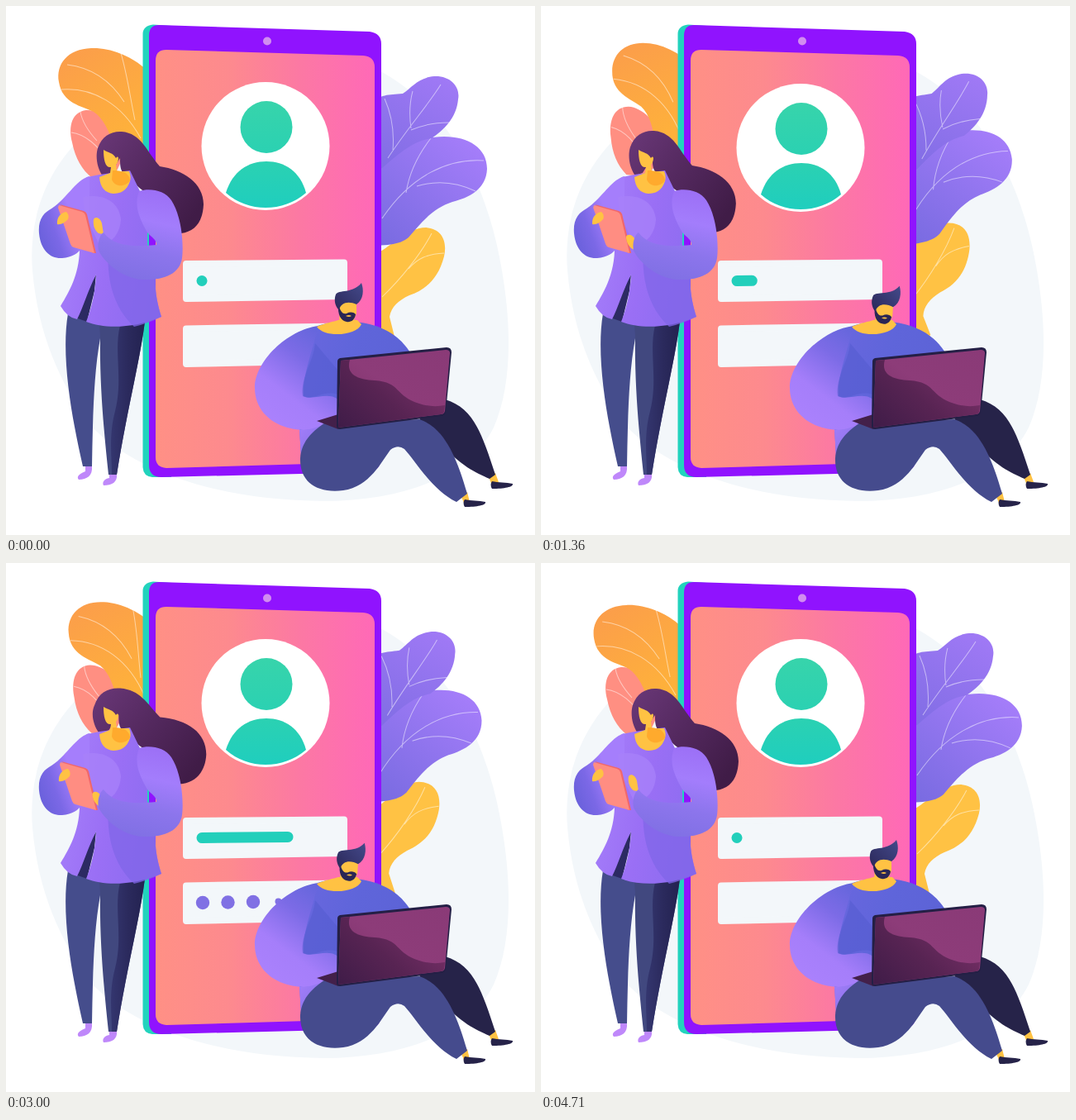
An HTML page for the animation above (4.78 s loop, 640 by 640 pixels).

```html
<!DOCTYPE html>
<html lang="en">
<head>
<meta charset="utf-8">
<title>Sign in</title>
<style>
  html, body { margin: 0; width: 100%; height: 100%; overflow: hidden; background: #fff; }
  svg { display: block; width: 100%; height: 100%; }
  .vein { fill: none; stroke: #fff; stroke-opacity: .5; stroke-width: 1; }
  .field { fill: #f3f7fa; stroke: #f3f7fa; stroke-width: 8; stroke-linejoin: round; }
</style>
</head>
<body>
<svg viewBox="0 0 640 640">
  <defs id="defs"></defs>
  <path fill="#f3f7fa" d="M90 160C40 210 28 270 32 320C39 400 66 455 100 505C150 560 250 598 385 599C480 598 560 570 590 510C612 460 612 390 600 320C585 230 545 130 455 80Z"/>

  <g id="salmon">
    <path fill="#ff8f82" d="M97 126C80 128 75 145 80 165C84 185 92 198 104 208L130 208L150 165C132 140 114 125 97 126Z"/>
    <path class="vein" d="M79 153C95 155 112 168 124 190M90 128C92 140 100 152 110 163"/>
  </g>
  <g id="orange">
    <path fill="url(#gOrange)" d="M165 73C150 60 125 50 103 51C75 52 60 70 64 92C68 118 92 121 106 128C118 136 124 150 132 172L190 195L215 150L205 95Z"/>
    <path class="vein" d="M67 101C105 98 140 118 163 160M74 71C100 74 125 88 143 116M139 57C147 84 150 110 156 138"/>
  </g>
  <g id="amber">
    <path fill="#ffc244" d="M508 268C528 270 534 285 530 303C523 330 508 343 488 350C475 356 466 364 464 376L470 400L445 405L425 380L440 305C468 290 485 268 508 268Z"/>
    <path class="vein" d="M515 275C502 300 478 330 455 352M530 299C510 300 498 305 487 318"/>
  </g>
  <g id="violet">
    <path fill="url(#gViolet)" d="M435 200C470 180 490 158 530 158C560 158 582 172 582 197C581 222 560 232 540 237C515 245 500 265 487 280C475 290 460 289 430 291Z"/>
    <path class="vein" d="M578 187C535 184 490 205 455 257M514 160C500 178 488 200 484 226M568 224C545 213 520 211 497 218"/>
  </g>
  <g id="sprig">
    <path fill="url(#gSprig)" d="M435 122C455 105 462 108 480 106C492 98 498 87 518 85C538 84 550 98 547 113C545 135 530 150 515 160C495 163 480 174 455 196L435 200Z"/>
    <path class="vein" d="M526 95C512 118 484 150 462 184M492 103C488 118 488 134 490 148M536 141C520 141 504 144 490 150M458 112C466 130 470 150 468 174"/>
  </g>

  <path fill="#22d3bd" d="M178 22.500Q165.500 24 165.500 34V558Q166 569 177 570L200 570L200 24Z"/>
  <path fill="#9013fe" d="M185 23L440 31Q454 33 454 46V546Q453 563 438 564L188 570Q173 570 173 555V36Q173 23 185 23Z"/>
  <path fill="url(#gScreen)" d="M194 53L432 60Q446 61 446 74V539Q446 551 434 552L194 559Q181 558 181 546V66Q181 53 194 53Z"/>
  <circle cx="316" cy="42.500" r="5" fill="#d18df0"/>
  <g id="avatar">
    <circle cx="314" cy="169.500" r="77.500" fill="#fff"/>
    <circle cx="315" cy="146.500" r="31.500" fill="url(#gTeal)"/>
    <path fill="url(#gTeal2)" d="M266 226C274 200 293 188 315 188C337 188 356 200 363 226C335 250 293 250 266 226Z"/>
  </g>
  <path class="field" d="M218 312L409 310.500V351L218 354Z"/>
  <path class="field" d="M218 390.400L409 387.400V429L218 433Z"/>
  <path id="entry" stroke="#22cfbb" stroke-width="13" stroke-linecap="round"/>
  <g id="dots" fill="#8070e4"></g>

  <g id="woman">
    <path fill="#454d8c" d="M75 372C66 425 80 500 93 557L104 557C105 500 106 445 114 402L122 380Z"/>
    <path fill="#41487f" d="M113 385L168 382C162 430 146 490 134 567L124 567C119 520 113 460 114 400Z"/>
    <path fill="url(#gLeg)" d="M138 386C130 420 142 450 132 490C124 520 128 545 128 567H134C146 490 162 430 168 382Z"/>
    <g fill="#bf88fa">
      <path d="M96 557H104C105 568 98 573 88 573C85 570 88 566 96 563Z"/>
      <path d="M125 567H134C135 576 128 580 118 580C116 576 119 572 125 571Z"/>
    </g>
    <path id="hair" fill="url(#gHair)"/>
    <path fill="#2c2a62" d="M109 325L107 345L98 382L84 377L96 345Z"/>
    <path fill="url(#gCoat)" d="M113 204L98 207C88 215 82 225 85 260L89 296C88 325 77 345 66 363Q74 377 86 379C93 366 99 344 109 325C108 345 104 364 97 382C120 391 155 390 188 376C180 350 178 330 185 300L171 292V262L163 226L150 199Z"/>
    <path fill="#8166e8" fill-opacity=".75" d="M124 292C121 330 130 365 155 388Q172 384 188 376C180 350 178 330 185 300Z"/>
    <path fill="url(#gCuff)" d="M101 206C84 210 72 236 52 247C42 253 39 263 40 275C42 296 54 306 68 305C80 304 88 299 92 292L101 250Z"/>
    <path fill="#a881fb" fill-opacity=".8" d="M93 231C118 227 136 236 139 258C138 276 128 286 114 291L96 254Z"/>
    <path fill="#ffc243" d="M118 174C124 178 129 177 133 184C137 179 137 188 133 192L134 200L149 200C151 205 151 209 150 212C146 224 138 227 130 227C120 226 114 220 113 207L126 202L127 195C120 196 118 186 118 174Z"/>
    <path fill="#ffaa2d" d="M129 199C140 199 149 201 150 211C145 219 132 220 128 210Z"/>
    <g id="tablet">
      <path fill="#f0676c" d="M65 240L94 248Q97 249 98 252L109 299L105 299L78 250Z"/>
      <path fill="#ff8d82" d="M64 241L92 249Q95 250 96 253L107 299L82 292Q79 291 78 288L63 244Z"/>
      <path fill="#ffc243" d="M62 264C61 256 66 250 73 249Q77 253 75 258C71 262 66 265 62 264Z"/>
    </g>
    <path id="hand" fill="#ffc243" d="M106 258C108 254 114 256 116 263L118 276L112 275C107 271 105 265 106 258Z"/>
    <path fill="url(#gArm)" d="M161 224C174 220 192 223 200 235C213 255 215 290 213 305C210 325 190 332 165 331C145 330 122 315 112 296C110 286 114 276 118 274C130 290 150 292 182 289C182 282 176 280 171 274C160 255 155 240 161 224Z"/>
  </g>

  <g id="man">
    <g fill="#ffc243">
      <path d="M550 592L558 588L561 600L554 601Z"/>
      <path d="M584 570L592 565L596 576L588 580Z"/>
    </g>
    <path fill="#262349" d="M500 500L531 476C565 486 575 515 592 567L585 572C570 565 548 556 528 530Z"/>
    <g fill="#262349">
      <path id="shoe" d="M555 597C563 599 572 598 580 600C581 604 570 606 555 606Q552 601 555 597Z"/>
      <use href="#shoe" x="33" y="-22"/>
    </g>
    <path fill="url(#gShirt)" d="M377 387C395 381 420 380 440 385C465 391 480 405 489 419L420 440L400 510L357 545L355 510L362 400Z"/>
    <path fill="url(#gSleeve)" d="M378 387C340 392 301 430 301 462C301 492 326 512 360 513C378 513 394 506 402 498V476C388 466 372 478 360 472C358 450 370 420 378 387Z"/>
    <path fill="#555ccf" fill-opacity=".55" d="M374 408C372 430 356 450 359 472C372 478 384 464 401 470V440Z"/>
    <path fill="url(#gThigh)" d="M355 513C370 513 386 507 396 500L390 530L357 546Z"/>
    <path fill="#454b8d" d="M356 547C358 525 372 514 386 504L500 500C530 510 545 545 558 590L545 600C515 585 495 550 482 536Q474 530 465 537C455 550 440 582 408 586C375 590 355 575 356 547Z"/>
    <path fill="#43204a" d="M376 502L402 494V512Z"/>
    <path fill="#241f45" d="M404 426L533 413Q539 413 539 419L532 491Q531 496 527 496L404 512Q400 512 400 508L401 430Q401 427 404 426Z"/>
    <path fill="url(#gLid)" d="M405 429L532 416Q537 416 537 420L531 490Q530 494 526 494L402 510Z"/>
    <path fill="url(#gShade)" d="M405 429L416 428C411 445 424 452 446 453C478 455 470 472 500 481Q515 486 531 483L530 491Q529 494 526 494L402 510Z"/>
    <path fill="#ffc243" d="M376 388C388 383 396 382 402 380H425L430 385C424 399 386 402 376 388Z"/>
    <g id="head">
      <path fill="#ffc243" d="M403 352H424V372L420 382L424 388H400Q405 382 403 365Z"/>
      <path fill="#2a2655" d="M402 361C405 371 408 373 412 372C416 370 420 370 423 373C422 380 417 383 412 382C405 381 401 373 402 361Z"/>
      <path fill="#ffc243" d="M411 375Q415 373 418 375Q415 377 411 375Z"/>
      <path fill="url(#gQuiff)" d="M403 368C397 362 397 354 399 349C402 343 420 348 430 335C433 343 433 355 424 361C415 357 405 358 403 368Z"/>
    </g>
  </g>
</svg>
<script>
const LOOP = 4780, SWAY = LOOP / 2;
const $ = id => document.getElementById(id);

// id, direction (x1 y1 x2 y2), colour stops
const gradients = [
  ["gOrange", "0 0 .7 1", "#fb9c4c", "#ffb835"],
  ["gViolet", "1 0 0 1", "#a97ffc", "#7469de"],
  ["gSprig", ".8 0 .2 1", "#9f79f5", "#806de4"],
  ["gScreen", "0 0 1 0", "#ff9085", "#fd8a8e", "#fc78a4", "#ff69b7"],
  ["gTeal", ".5 0 .5 1", "#37d4ab", "#2bd1b2"],
  ["gTeal2", ".5 0 .5 1", "#2bd1b2", "#1fcebe"],
  ["gLeg", "0 0 1 0", "#34366f", "#2b2a5d", "#232250"],
  ["gHair", "0 0 1 .7", "#6a3878", "#54295f", "#401c47"],
  ["gCoat", "0 .3 1 .6", "#a67ffa", "#9a6ff5", "#8c6cf0"],
  ["gCuff", "0 .9 1 .3", "#665fd9", "#7b68e6", "#a57efc", "#a57efc"],
  ["gArm", ".6 0 .4 1", "#9c70f6", "#a37dfc", "#8c75ec", "#8070e4"],
  ["gShirt", "0 0 1 .4", "#6a67df", "#5f65da", "#5c63d6"],
  ["gSleeve", ".2 1 .8 0", "#ab82fd", "#a57efa", "#7c6be6", "#6165da"],
  ["gThigh", "0 0 1 1", "#a67ffb", "#7d6de2"],
  ["gLid", "0 1 1 0", "#763067", "#8d3c79", "#8a3a77"],
  ["gShade", "0 1 1 .3", "#3f1c48", "#582453", "#7a3169"],
  ["gQuiff", "0 1 1 0", "#2b2859", "#444a8b"]
];
$("defs").innerHTML = gradients.map(([id, dir, ...stops]) => {
  const [x1, y1, x2, y2] = dir.split(" ");
  const marks = stops.map((c, i) => `<stop offset="${i / (stops.length - 1)}" stop-color="${c}"/>`);
  return `<linearGradient id="${id}" x1="${x1}" y1="${y1}" x2="${x2}" y2="${y2}">${marks.join("")}</linearGradient>`;
}).join("");

$("dots").innerHTML = [0, 1, 2, 3].map(i =>
  `<circle cx="${238 + 30.5 * i}" cy="${411 - 0.5 * i}"/>`).join("");
const dots = [...$("dots").children];

const hairDown = "M117 206C110 196 108 182 111 172C116 157 128 151 140 152C164 154 170 176 186 194C214 198 239 214 239 240C238 262 228 273 212 275C205 262 200 245 188 230C176 230 160 224 150 206C138 204 138 194 138 184C134 190 130 197 126 203Z";
const hairUp = "M114 206C107 196 104 182 109 172C114 157 126 151 140 152C164 154 172 170 188 187C222 190 244 206 244 232C243 254 230 267 212 268C205 258 200 245 188 230C176 230 160 224 150 206C138 204 138 194 138 184C134 190 130 197 126 203Z";

// leaf, swing angle, pivot
const leaves = [
  ["orange", 10.5, 150, 212],
  ["salmon", 7, 138, 200],
  ["sprig", -4.7, 475, 200],
  ["violet", -5.1, 435, 335],
  ["amber", -7.8, 458, 388]
];

const ramp = (t, a, b) => Math.min(1, Math.max(0, (t - a) / (b - a)));
const ease = (t, a, b) => { const p = ramp(t, a, b); return p * p * (3 - 2 * p); };
const pulse = (t, a, b, c, d) => ease(t, a, b) - ease(t, c, d);
const place = (id, value) => $(id).setAttribute("transform", value);

function mixPath(from, to, k) {
  const ends = to.match(/\d+/g);
  let i = 0;
  return from.replace(/\d+/g, n => (+n + (ends[i++] - n) * k).toFixed(2));
}

function draw(t) {
  const wave = Math.cos(2 * Math.PI * t / SWAY);
  const sway = (1 - wave) / 2;
  for (const [id, angle, x, y] of leaves) place(id, `rotate(${angle * sway} ${x} ${y})`);

  place("avatar", `translate(0 ${2 * pulse(t, 400, 1300, 1450, 2350)})`);

  const clear = ease(t, 4180, 4540);
  const length = 104 * (ramp(t, 1150, 2350) - clear);
  $("entry").setAttribute("d", `M237 332.5L${237.01 + length} ${332.5 - length / 104}`);
  dots.forEach((dot, i) => {
    const start = 2375 + 160 * i;
    dot.setAttribute("r", 8.2 * (ramp(t, start, start + 300) - clear));
  });

  $("hair").setAttribute("d", mixPath(hairDown, hairUp, pulse(t, 1450, 2450, 4160, 4700)));
  place("hair", `translate(${-3.3 * sway} ${-sway})`);

  place("tablet", `translate(${4 * pulse(t, 1200, 2500, 2650, 3350)} 0)`);
  const lower = 1 - Math.max(0, wave);
  place("hand", `translate(${3 * pulse(t, 1900, 2400, 2700, 3300)} ${19 * lower}) rotate(${-12 * lower} 116 274)`);

  const nod = pulse(t, 0, 560, 3700, 4660);
  place("head", `translate(0 ${1.5 * nod}) rotate(${4 * nod} 400 390)`);
}

function tick() {
  draw(performance.now() % LOOP);
  requestAnimationFrame(tick);
}
tick();
</script>
</body>
</html>
```
